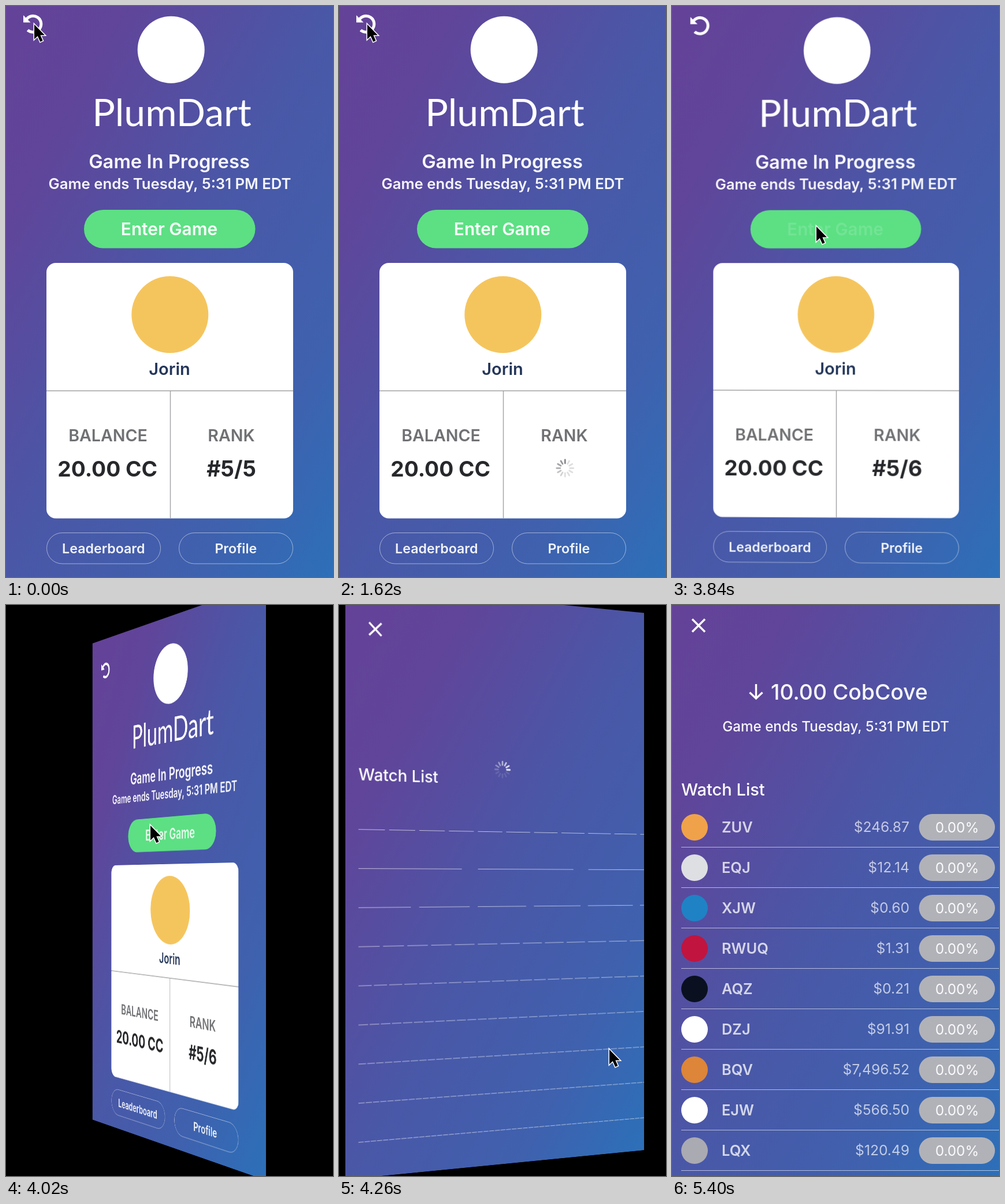
Animation of 566x989 px, one loop 5.46 s. Source, as an HTML page with a canvas:

```html
<!DOCTYPE html>
<html lang="en">
<head>
<meta charset="utf-8">
<title>Game lobby</title>
<style>
  html, body { margin: 0; width: 100%; height: 100%; overflow: hidden; background: #000; }
  #stage {
    position: relative; width: 566px; height: 989px; overflow: hidden;
    perspective: 1875px; perspective-origin: 283px 479px;
  }
  canvas { position: absolute; left: 0; top: 0; }
  #lobby, #game { left: -7px; top: -36px; }
</style>
</head>
<body>
<div id="stage">
  <canvas id="lobby" width="580" height="1030"></canvas>
  <canvas id="game" width="580" height="1030"></canvas>
  <canvas id="pointer" width="566" height="989"></canvas>
</div>
<script>
const LOOP = 5460, STEP = 60;
const FLIP_START = 3811, FLIP_TIME = 569, LOADED = 5100;
const MID_Y = 479;
const UI = 'Inter, "Open Sans", sans-serif';

const canvases = ['lobby', 'game', 'pointer'].map(id => document.getElementById(id));
const [lobby, game, pointer] = canvases;
const [lobbyCtx, gameCtx, pointerCtx] = canvases.map(c => c.getContext('2d'));

const clamp = (v, lo = 0, hi = 1) => Math.min(hi, Math.max(lo, v));
const smooth = p => p * p * (3 - 2 * p);
const white = alpha => `rgba(255,255,255,${alpha})`;

// y is the middle of the capital letters
function text(c, str, x, y, size, weight, color, align = 'center', family = UI) {
  c.font = `${weight} ${size}px ${family}`;
  c.textAlign = align;
  c.fillStyle = color;
  c.fillText(str, x, y + size * 0.364);
}

function pill(c, x, y, w, h, r) {
  c.beginPath();
  c.roundRect(x, y, w, h, r);
}

function disc(c, x, y, r, color) {
  c.fillStyle = color;
  c.beginPath();
  c.arc(x, y, r, 0, 7);
  c.fill();
}

function line(c, x1, y1, x2, y2, color, width) {
  c.strokeStyle = color;
  c.lineWidth = width;
  c.beginPath();
  c.moveTo(x1, y1);
  c.lineTo(x2, y2);
  c.stroke();
}

function beginPage(c) {
  c.setTransform(580, 0, 0, 1030, 0, 0);
  const g = c.createLinearGradient(0, 0, 1, 1);
  g.addColorStop(0, '#644298');
  g.addColorStop(0.2, '#60459a');
  g.addColorStop(0.5, '#4a57a7');
  g.addColorStop(0.78, '#3f61ae');
  g.addColorStop(1, '#2c70b9');
  c.fillStyle = g;
  c.fillRect(0, 0, 1, 1);
  c.setTransform(1, 0, 0, 1, 7, 36);
}

function spinner(c, x, y, t, offset, rgb, minAlpha, maxAlpha) {
  const head = Math.floor(t * 12 / 1000) + offset;
  c.save();
  c.translate(x, y);
  c.lineCap = 'round';
  for (let i = 0; i < 12; i++) {
    const age = (((head - i) % 12) + 12) % 12;
    const alpha = Math.max(minAlpha, maxAlpha * (1 - age / 8));
    const a = i * Math.PI / 6 - Math.PI / 2;
    const dx = Math.cos(a), dy = Math.sin(a);
    line(c, dx * 8.5, dy * 8.5, dx * 14.5, dy * 14.5, `rgba(${rgb},${alpha})`, 2.8);
  }
  c.restore();
}

function refreshIcon(c, alpha) {
  c.save();
  c.globalAlpha = alpha;
  c.strokeStyle = c.fillStyle = '#fff';
  c.lineWidth = 5;
  c.beginPath();
  c.arc(46.8, 31.3, 14, -2.55, 2.3);
  c.stroke();
  c.beginPath();
  c.moveTo(30, 16);
  c.lineTo(30, 28.5);
  c.lineTo(42.5, 28.5);
  c.fill();
  c.restore();
}

function drawLobby(t) {
  const c = lobbyCtx;
  beginPage(c);
  const pressed = t >= 1320 && t < 1560;
  refreshIcon(c, pressed ? 0.3 + 0.7 * clamp((t - 1380) / 180) : 1);

  disc(c, 285.7, 75.7, 58, '#fff');
  text(c, 'PlumDart', 287, 183.5, 66, 400, '#fff', 'center', 'Lato, sans-serif');
  text(c, 'Game In Progress', 282.5, 269, 32.7, 600, white(0.96));
  text(c, 'Game ends Tuesday, 5:31 PM EDT', 283.5, 307.5, 25.7, 600, white(0.95));

  c.fillStyle = '#5ce083';
  pill(c, 135, 353, 296.5, 66.5, 33.2);
  c.fill();
  const label = t < 3690 ? 1 : clamp(0.15 + 0.85 * (t - 3840) / 210, 0.15, 1);
  text(c, 'Enter Game', 282.5, 386.5, 29.8, 600, white(0.96 * label));

  c.fillStyle = '#fff';
  pill(c, 70, 445, 427, 442.5, 16);
  c.fill();
  disc(c, 283.8, 534.5, 66.5, '#f5c55d');
  text(c, 'Jorin', 283, 628, 29, 600, '#24365a');
  line(c, 70, 666.5, 497, 666.5, '#a0a0a2', 1.5);
  line(c, 284.5, 667, 284.5, 887.5, '#a6a6a8', 1.5);

  text(c, 'BALANCE', 176.5, 743.5, 28.6, 600, '#707174');
  text(c, 'RANK', 390, 743.5, 28.6, 600, '#707174');
  text(c, '20.00 CC', 175.7, 801, 37.2, 700, '#27282b');
  if (t >= 1440 && t < 1980) spinner(c, 391.3, 800.5, t, 5, '95,95,100', 0.2, 0.75);
  else text(c, t < 1980 ? '#5/5' : '#5/6', 390, 801, 37.6, 700, '#27282b');

  for (const [label, x] of [['Leaderboard', 70.5], ['Profile', 299.5]]) {
    c.strokeStyle = white(0.5);
    c.lineWidth = 1;
    pill(c, x, 912.5, 197, 53.5, 26.7);
    c.stroke();
    text(c, label, x + 98.3, 940, 23.2, 600, white(0.93));
  }
}

const rows = [
  ['ZUV', '$246.87', '#f0a24a'],
  ['EQJ', '$12.14', '#dedfe3'],
  ['XJW', '$0.60', '#1f82c4'],
  ['RWUQ', '$1.31', '#c1143f'],
  ['AQZ', '$0.21', '#0b1020'],
  ['DZJ', '$91.91', '#ffffff'],
  ['BQV', '$7,496.52', '#dd8538'],
  ['EJW', '$566.50', '#ffffff'],
  ['LQX', '$120.49', '#aaaab2']
];

function drawLoading(c, t, tilt) {
  spinner(c, 283, 275, t, 0, '255,255,255', 0.12, 0.95);
  text(c, 'Watch List', 16, 292, 29, 500, '#fff', 'left');
  for (let i = 0; i < rows.length; i++) {
    const y = 388.5 + 67.9 * i;
    // tilted hairlines break up where they step between pixel rows
    if (tilt > 0.01) {
      const period = 1750 / (Math.abs(y - MID_Y) * tilt);
      c.setLineDash([period * 0.86, period * 0.14]);
    }
    line(c, 16, y, 573, y, white(0.65), 1);
    c.setLineDash([]);
  }
}

function drawList(c) {
  line(c, 145.5, 137, 145.5, 161, '#fff', 3.4);
  c.beginPath();
  c.moveTo(134.5, 151.5);
  c.lineTo(145.5, 162);
  c.lineTo(156.5, 151.5);
  c.stroke();
  text(c, '10.00 CobCove', 171, 150, 37.3, 500, white(0.96), 'left');
  text(c, 'Game ends Tuesday, 5:31 PM EDT', 283.5, 210, 24.2, 500, white(0.95));
  text(c, 'Watch List', 16, 319.5, 29, 500, '#fff', 'left');
  rows.forEach(([code, price, color], i) => {
    const y = 385 + 70 * i;
    disc(c, 39, y, 23, color);
    text(c, code, 86, y, 25.4, 600, white(0.76), 'left');
    text(c, price, 411, y - 0.5, 24.6, 400, white(0.68), 'right');
    c.fillStyle = '#b1b2b8';
    pill(c, 427.5, y - 23, 131.5, 46, 23);
    c.fill();
    text(c, '0.00%', 493.5, y, 24.2, 400, white(0.95));
    line(c, 16, y + 34.5, 573, y + 34.5, white(0.6), 1);
  });
}

function drawGame(t, tilt) {
  const c = gameCtx;
  const loaded = t >= LOADED;
  const y = loaded ? 35.5 : 38.5;
  beginPage(c);
  line(c, 35, y - 11, 57, y + 11, '#fff', 3.4);
  line(c, 57, y - 11, 35, y + 11, '#fff', 3.4);
  if (loaded) drawList(c);
  else drawLoading(c, t, tilt);
}

const pointerPath = [
  [0, 49, 32], [2520, 49, 32], [2640, 45, 40], [3120, 45, 40], [3480, 250, 382],
  [4080, 250, 382], [4260, 468, 770], [4380, 610, 1020], [LOOP, 610, 1020]
];

function drawPointer(t) {
  const i = pointerPath.findIndex(key => key[0] > t);
  const [t0, x0, y0] = pointerPath[i - 1], [t1, x1, y1] = pointerPath[i];
  const p = (t - t0) / (t1 - t0);
  const c = pointerCtx;
  c.setTransform(1, 0, 0, 1, 0, 0);
  c.clearRect(0, 0, 566, 989);
  c.translate(x0 + (x1 - x0) * p, y0 + (y1 - y0) * p);
  c.beginPath();
  for (const [x, y] of [[0, 0], [0, 25.5], [5.8, 20], [10.3, 30], [14.6, 28], [10.4, 18.5], [18, 18.5]]) c.lineTo(x, y);
  c.closePath();
  c.lineWidth = 3;
  c.strokeStyle = '#fff';
  c.stroke();
  c.fillStyle = '#000';
  c.fill();
}

function render(now) {
  const t = Math.floor((now % LOOP) / STEP) * STEP;
  const turn = Math.PI * smooth(clamp((t - FLIP_START) / FLIP_TIME));
  const tilt = Math.sin(turn);
  const front = turn < Math.PI / 2;
  const page = front ? lobby : game;
  const angle = front ? -turn : Math.PI - turn;

  lobby.style.visibility = front ? 'visible' : 'hidden';
  game.style.visibility = front ? 'hidden' : 'visible';
  page.style.transform = tilt < 1e-6 ? 'none'
    : `translateZ(${-278 * tilt}px) rotateY(${angle}rad)`;

  if (front) drawLobby(t);
  else drawGame(t, tilt);
  drawPointer(t);
}

const start = performance.now();
function tick() {
  render(performance.now() - start);
  requestAnimationFrame(tick);
}
tick();
</script>
</body>
</html>
```
